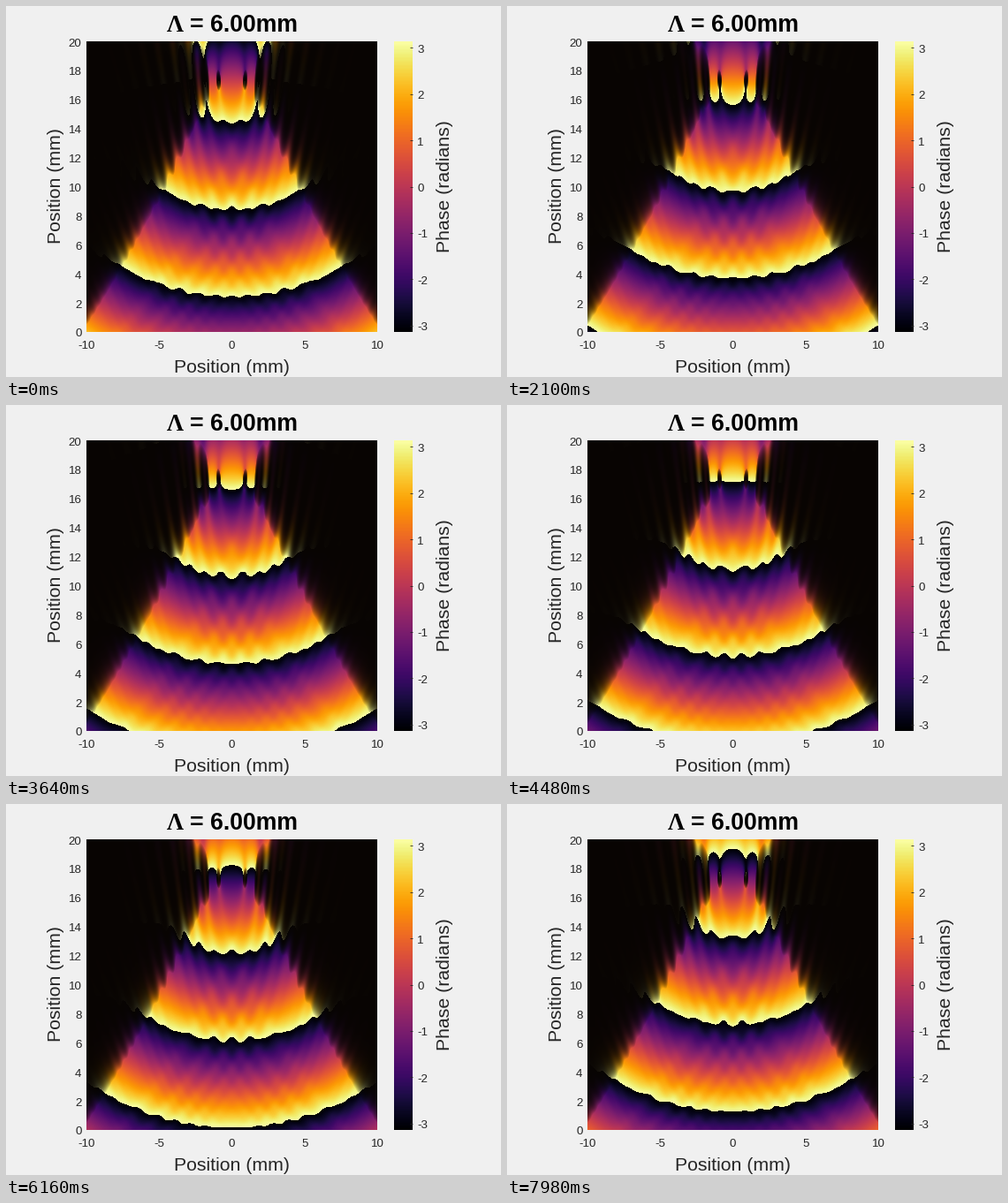
Animation, 560 px wide and 420 px high, one loop 8000 ms. Source, as a matplotlib script:

```python
import numpy as np
import matplotlib
import matplotlib.pyplot as plt
from matplotlib.animation import FuncAnimation

W, H, DPI = 560, 420, 100
LEFT, TOP, N = 91, 40, 329          # plot box in pixels
INK = "#262626"
BACK = np.array([8, 4, 2])

SYNTH = 6.0                         # synthetic wavelength, mm
WAVE_A, WAVE_B = SYNTH / 6.5, SYNTH / 5.5
RADIUS, FOCAL = 12.7, 20.0          # lens, mm
LENS_Y = -2.7                       # lens plane below the plot
START = 2.45                        # height of the lowest front at t = 0
STEP = 2 * np.pi / 71
TICK, HOLD, LOOP = 40, 140, 8000    # ms


def focused_field(wave, pad=4096):
    """Angular spectrum propagation of a converging wave behind a slit."""
    dx = 20 / N
    k = 2 * np.pi / wave
    x = (np.arange(pad) - pad // 2) * dx
    slit = np.abs(x) <= RADIUS
    spectrum = np.fft.fft(slit * np.exp(-1j * k * np.hypot(x, FOCAL)))
    kx = 2 * np.pi * np.fft.fftfreq(pad, dx)
    kz = np.sqrt(k**2 - kx**2 + 0j)
    lo = pad // 2 - N // 2
    heights = (np.arange(N) + 0.5) * dx - LENS_Y
    rows = [np.fft.ifft(spectrum * np.exp(1j * kz * z))[lo:lo + N]
            for z in heights]
    return np.array(rows)


beat = focused_field(WAVE_A) * np.conj(focused_field(WAVE_B))
alpha = np.clip(np.abs(beat)**2 / 0.5, 0, 1)[..., None]
phase0 = 2 * np.pi / SYNTH * (START - FOCAL - LENS_Y) - np.angle(beat)
lut = matplotlib.colormaps["inferno"](np.arange(256))[:, :3] * 255
shade = BACK * (1 - alpha)


def picture(k):
    turn = (phase0 + STEP * k) / (2 * np.pi) % 1
    index = np.minimum((turn * 256).astype(int), 255)
    return (lut[index] * alpha + shade + 0.5).astype(np.uint8)


fig = plt.figure(figsize=(W / DPI, H / DPI), dpi=DPI, facecolor="#f0f0f0")


def box(x, y, w, h):
    return fig.add_axes([x / W, 1 - (y + h) / H, w / W, h / H])


def label(x, y, text, px=13.33, ha="center", **style):
    style = {"color": INK, "family": "Liberation Sans", **style}
    fig.text(x / W, 1 - y / H, text, fontsize=px * 72 / DPI, ha=ha,
             va="baseline", rotation_mode="anchor", **style)


ax = box(LEFT, TOP, N, N)
ax.axis("off")
image = ax.imshow(picture(0), origin="lower", interpolation="nearest",
                  aspect="auto")

bar = box(439, TOP, 21, N)
bar.imshow(lut[:, None].astype(np.uint8), origin="lower", aspect="auto",
           interpolation="nearest", extent=(0, 1, -np.pi, np.pi))
bar.set_xticks([])
bar.set_yticks(range(-3, 4), [""] * 7)
bar.yaxis.tick_right()
bar.tick_params(direction="in", length=2.2, width=0.6, color=INK)
bar.spines[:].set_visible(False)

bottom = TOP + N
for v in range(-10, 11, 5):
    label(LEFT + (v + 10) * N / 20, 388, str(v))
for v in range(0, 21, 2):
    label(85.5, bottom - v * N / 20 + 5.5, str(v), ha="right")
for v in range(-3, 4):
    label(465, TOP + N / 2 * (1 - v / np.pi) + 5.5, str(v), ha="left")

label(255.5, 415, "Position (mm)", 21.33)
label(62, 203.5, "Position (mm)", 21.33, rotation=90)
label(502, 204.5, "Phase (radians)", 21.33, rotation=90)
label(181.5, 29, "\u039b", 26.67, ha="left", color="black",
      family="Liberation Serif", weight="bold")
label(208, 29, "= 6.00mm", 26.67, ha="left", color="black", weight="bold")


def update(n):
    image.set_data(picture((n * TICK + TICK // 2) // HOLD))
    return [image]


anim = FuncAnimation(fig, update, frames=LOOP // TICK, interval=TICK,
                     repeat=True, repeat_delay=0, blit=False)
plt.show()
```
